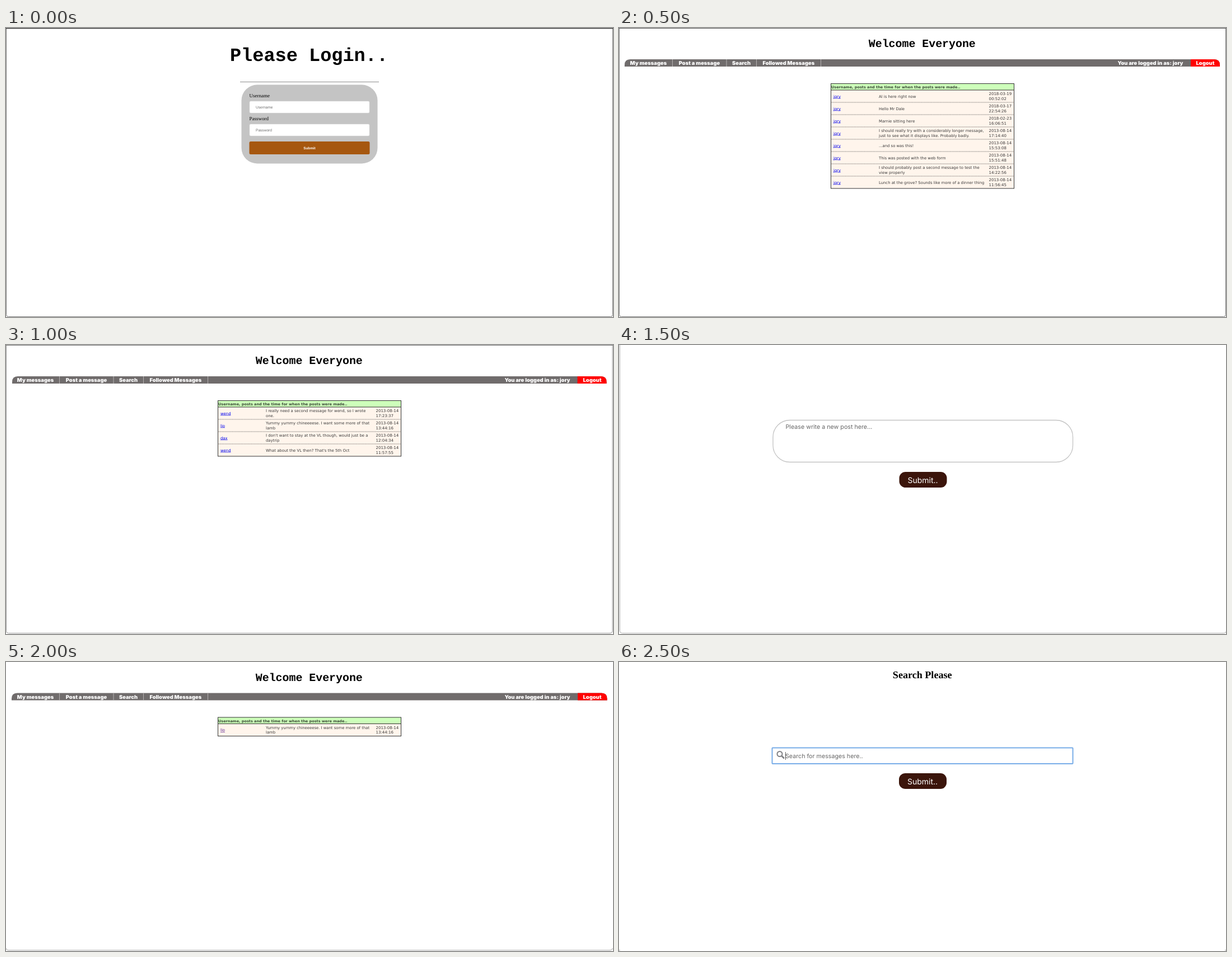
Animation of 1084x517 px, one loop 3000 ms. Source, as an HTML page:

```html
<!DOCTYPE html>
<html lang="en">
<head>
<meta charset="utf-8">
<title>Message board tour</title>
<style>
  html, body { margin: 0; width: 100%; height: 100%; overflow: hidden; background: #fff; }
  svg { display: block; width: 1084px; height: 517px; }
  text { text-rendering: geometricPrecision; white-space: pre; }

  .slide { visibility: hidden; animation: show 3s step-end infinite; animation-delay: calc(var(--i) * .5s - 3s); }
  .slide:first-child { visibility: visible; animation: none; }
  @keyframes show {
    0% { visibility: visible; }
    16.666%, 100% { visibility: hidden; }
  }

  .mid { text-anchor: middle; }
  .mono { font: bold 19.9px "Liberation Mono", monospace; }
  .login { font-size: 33.6px; }
  .label { font: 9px "Liberation Serif", serif; }
  .heading { font: bold 18.1px "Liberation Serif", serif; }
  .hint { font: 6.6px "Liberation Sans", sans-serif; fill: #6b6b6b; }
  .send { font: bold 6.3px "Liberation Sans", sans-serif; fill: #fff; }
  .nav { font: 900 9.4px Inter, sans-serif; fill: #fff; }
  .caption { font: bold 6.53px "DejaVu Sans", sans-serif; fill: #3c4a38; }
  .cell { font: 6.85px "DejaVu Sans", sans-serif; fill: #3a3a3a; }
  .date { font-size: 7px; }
  .link { fill: #00e; text-decoration: underline; }
  .visited { fill: #551a8b; }
  .prompt { font: 10.7px Inter, sans-serif; fill: #666; }
  .submit { font: 14px Inter, sans-serif; fill: #fff; }
</style>
</head>
<body>
<svg id="stage" viewBox="0 0 1084 517"></svg>
<script>
const text = (x, y, cls, str) => `<text x="${x}" y="${y}" class="${cls}">${str}</text>`;
const rect = (x, y, w, h, fill, extra = "") =>
  `<rect x="${x}" y="${y}" width="${w}" height="${h}" fill="${fill}" ${extra}/>`;
const path = (d, stroke, width = 1, extra = "") =>
  `<path d="${d}" fill="none" stroke="${stroke}" stroke-width="${width}" ${extra}/>`;

// Window edge: both sides and the bottom with rounded lower corners
const edge = (left, right, bottom, color) =>
  path(`M${left} 0V${bottom - 4}q0 4 4 4H${right - 4}q4 0 4 -4V0`, color);

const field = (y, hint) =>
  rect(435, y, 214, 21, "#fff", 'rx="2" stroke="#ddd" stroke-width=".5"') + text(446, y + 13, "hint", hint);

const submit = (x, y) =>
  rect(x, y, 85, 28, "#3b150b", 'rx="11"') + text(x + 42, y + 20, "submit mid", "Submit..");

function navBar(left, right, y, logout) {
  const items = [[52.5, "My messages"], [143.5, "Post a message"], [218.5, "Search"],
    [302.8, "Followed Messages"], [949, "You are logged in as: jory"], [1047, "Logout"]];
  const base = y + 10.3;
  return `<path d="M${left} ${y + 13}v-3q0 -10 10 -10H${right - 10}q10 0 10 10v3z" fill="#706c6c"/>` +
    `<path d="M${logout} ${y}H${right - 10}q10 0 10 10v3H${logout}z" fill="#f00"/>` +
    path([95.5, 192, 245.5, 360.5].map(x => `M${x} ${y}v13`).join(""), "#b5b2b2") +
    items.map(([x, s]) => text(x, base, "nav mid", s)).join("");
}

function table(y, rows, linkClass) {
  const x = 378.5, w = 327, head = 11.5, step = 22;
  const h = head + step * rows.length;
  let out = rect(x, y, w, h, "#fff5ec") + rect(x, y, w, head, "#cfb".length ? "#cdffba" : "") +
    text(379, y + 8.6, "caption", "Username, posts and the time for when the posts were made..");
  rows.forEach(([user, lines, day, time], i) => {
    const top = y + head + step * i;
    const pair = [top + 9.4, top + 17.9], single = top + 13.5;
    out += text(383, single, "cell " + linkClass, user);
    out += lines.map((s, k) => text(464, lines.length > 1 ? pair[k] : single, "cell", s)).join("");
    out += text(660.5, pair[0], "cell date", day) + text(660.5, pair[1], "cell date", time);
    if (i) out += path(`M${x} ${top}h${w}`, "#555", .8, 'stroke-dasharray="1 .7"');
  });
  return out + path(`M${x} ${y + head}h${w}`, "#333") +
    rect(x, y, w, h, "none", 'stroke="#333"');
}

const welcome = y => text(541.3, y, "mono mid", "Welcome Everyone");

const own = [
  [["Al is here right now"], "2018-03-19", "00:52:02"],
  [["Hello Mr Dale"], "2018-03-17", "22:54:26"],
  [["Marnie sitting here"], "2018-02-23", "16:06:51"],
  [["I should really try with a considerably longer message,",
    "just to see what it displays like. Probably badly."], "2013-08-14", "17:14:40"],
  [["...and so was this!"], "2013-08-14", "15:53:08"],
  [["This was posted with the web form"], "2013-08-14", "15:51:48"],
  [["I should probably post a second message to test the", "view properly"], "2013-08-14", "14:22:56"],
  [["Lunch at the grove? Sounds like more of a dinner thing"], "2013-08-14", "11:56:45"]
].map(row => ["jory", ...row]);

const lamb = ["lio", ["Yummy yummy chineeeese. I want some more of that", "lamb"], "2013-08-14", "13:44:16"];
const followed = [
  ["wend", ["I really need a second message for wend, so I wrote", "one."], "2013-08-14", "17:23:37"],
  lamb,
  ["dax", ["I don't want to stay at the VL though, would just be a", "daytrip"], "2013-08-14", "12:04:34"],
  ["wend", ["What about the VL then? That's the 5th Oct"], "2013-08-14", "11:57:55"]
];

const slides = [
  edge(.5, 1083.5, 516.5, "#777") + rect(0, 0, 1084, 1.3, "#333") +
    text(541, 59, "mono login mid", "Please Login..") +
    path("M418 96.5H666", "#8c8c8c") +
    rect(420.5, 101.5, 243, 141, "#c4c4c4", 'rx="28"') +
    text(434.5, 124, "label", "Username") + field(131, "Username") +
    text(434.5, 165, "label", "Password") + field(172, "Password") +
    rect(434.5, 203, 215, 23, "#a6570f", 'rx="2.5"') + text(542, 217, "send mid", "Submit"),

  edge(.5, 1083.5, 516.5, "#777") + rect(0, 0, 1084, 1, "#555") +
    welcome(34) + navBar(10, 1073, 56, 1021) + table(99.5, own, "link"),

  edge(.5, 1083, 515.5, "#999") + rect(0, 0, 1084, 1, "#777") +
    welcome(34) + navBar(11, 1072.5, 56, 1020.5) + table(99.5, followed, "link"),

  edge(1.5, 1084.5, 515.5, "#aaa") +
    rect(275, 134.5, 535.5, 75, "#fff", 'rx="30" stroke="#c4c4c4" stroke-width="1.3"') +
    text(297.5, 150, "prompt", "Please write a new post here...") + submit(500.5, 227),

  path("M0 512q0 3.5 4 3.5H1079q4 0 4 -3.5", "#aaa") +
    welcome(33.5) + navBar(10, 1073.5, 55.5, 1021) + table(99, [lamb], "link visited"),

  path("M0 515.5h2M1082 515.5h2", "#aaa") +
    text(541.7, 29, "heading mid", "Search Please") +
    rect(273.5, 153.5, 537, 28.5, "#fff", 'rx="1" stroke="#79ade8" stroke-width="2"') +
    `<circle cx="287" cy="164.5" r="4.5" fill="none" stroke="#7f8084" stroke-width="2"/>` +
    path("M290.5 168L295 172.5", "#7f8084", 2.6) +
    path("M297.5 161v14", "#333", .8) +
    text(297, 172, "prompt", "Search for messages here..") + submit(500, 199)
];

document.getElementById("stage").innerHTML = slides.map((body, i) =>
  `<g class="slide" style="--i:${i}">${rect(0, 0, 1084, 517, "#fff")}${body}</g>`).join("");
</script>
</body>
</html>
```
